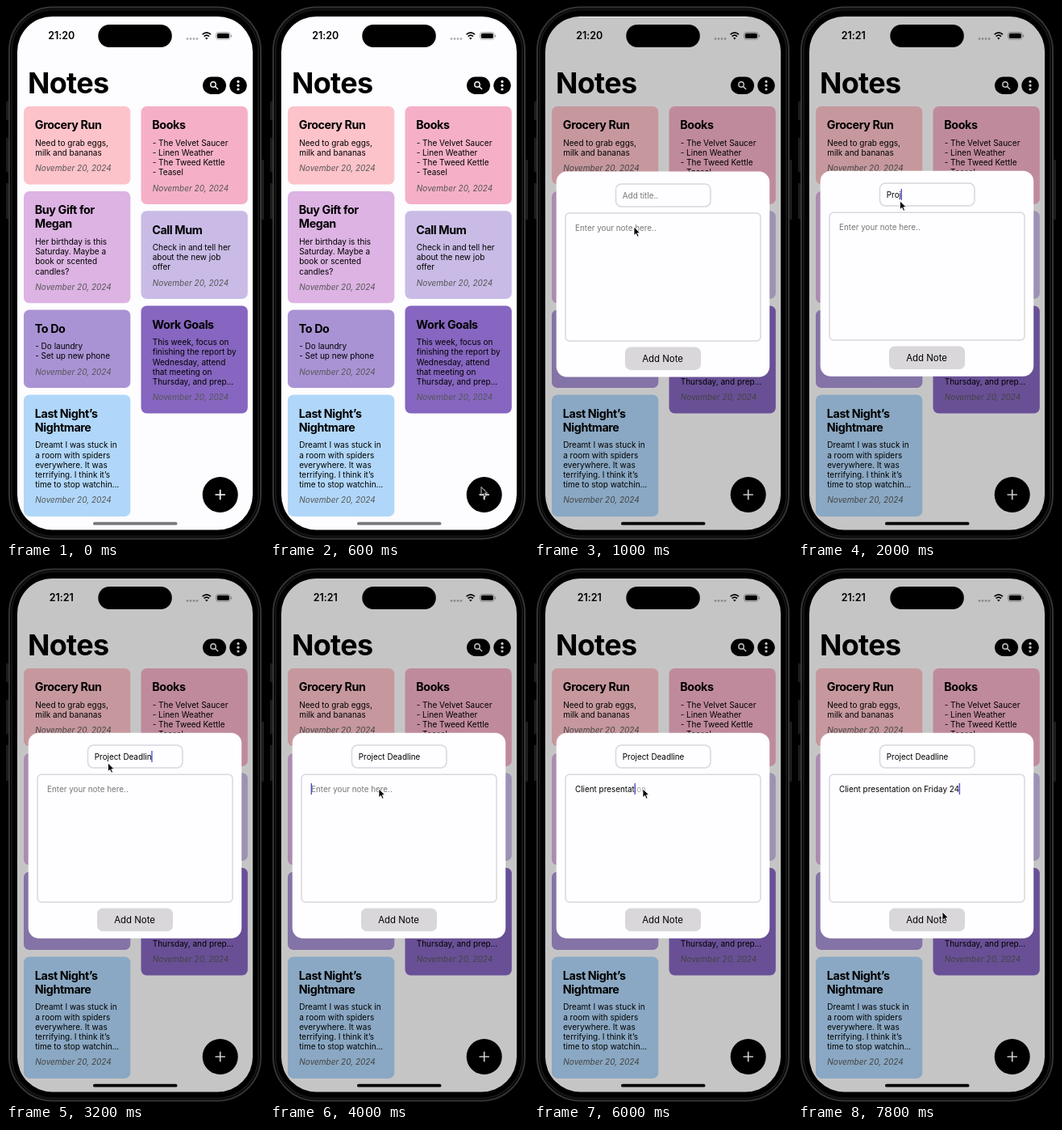
Animation, 320 px wide and 660 px high, one loop 8 s. Source, as an HTML page:

```html
<!DOCTYPE html>
<html lang="en">
<head>
<meta charset="utf-8">
<title>Notes app</title>
<style>
  html, body { margin: 0; width: 100%; height: 100%; overflow: hidden; background: #000; }
  svg { display: block; width: 320px; height: 660px; }
  text { font: 10px Inter, sans-serif; white-space: pre; }
  .heading { font-size: 36px; font-weight: 700; letter-spacing: -.7px; }
  .title { font-size: 14.3px; font-weight: 700; letter-spacing: -.4px; }
  .date { font-style: italic; fill: #555; }
  .clock { font-size: 12.5px; font-weight: 600; letter-spacing: -.05px; }
  .field { font-size: 9.9px; }
  .button { font-size: 11.4px; }
  .middle { text-anchor: middle; }
  .hint { fill: #777; }
  .box { fill: #fefdff; stroke: #d9d7de; stroke-width: 1.5; }
</style>
</head>
<body>
<svg viewBox="0 0 320 660">
  <defs>
    <clipPath id="screen"><rect x="14" y="13" width="292" height="634.5" rx="43.5"/></clipPath>
  </defs>
  <rect width="320" height="660"/>
  <g fill="#1c1c1d">
    <rect y="118" width="4" height="23"/>
    <rect y="163" width="4" height="42"/>
    <rect y="219" width="4" height="44"/>
    <rect x="317" y="190" width="3" height="74"/>
  </g>
  <g fill="none">
    <rect x="4" y="1.5" width="312" height="657" rx="54" stroke="#343436" stroke-width="2"/>
    <rect x="7" y="4.5" width="306" height="651" rx="51" stroke="#161617" stroke-width="2"/>
  </g>

  <g clip-path="url(#screen)">
    <rect x="14" y="13" width="292" height="635" fill="#fdfcfe"/>
    <text class="heading" x="27" y="108">Notes</text>
    <rect x="244" y="87.5" width="29" height="21.5" rx="10.7"/>
    <circle cx="288" cy="98.2" r="10.7"/>
    <g fill="none" stroke="#fff" stroke-width="1.4">
      <circle cx="257" cy="97" r="3.2"/>
      <path d="M259.4 99.4l3.7 3.7"/>
    </g>
    <g fill="#fff">
      <circle cx="288" cy="93.4" r="1.6"/>
      <circle cx="288" cy="98.2" r="1.6"/>
      <circle cx="288" cy="103" r="1.6"/>
    </g>
    <g id="cards"></g>
    <circle cx="265.7" cy="604" r="22"/>
    <path d="M259.5 604h12.4M265.7 597.8v12.4" stroke="#fff" stroke-width="1.7"/>

    <g id="sheet">
      <rect x="14" y="13" width="292" height="635" fill-opacity=".22"/>
      <rect x="27.7" y="203.7" width="264.5" height="254" rx="13" fill="#fefdff"/>
      <rect class="box" x="101.5" y="219" width="117.5" height="28" rx="7"/>
      <rect class="box" x="39" y="255.2" width="242" height="157.8" rx="5"/>
      <rect x="113" y="420.5" width="94" height="28.5" rx="7" fill="#d9d7da"/>
      <text class="button middle" x="159.6" y="439">Add Note</text>
      <g id="titleField"></g>
      <g id="noteField"></g>
    </g>
  </g>

  <rect x="114.3" y="23" width="91.5" height="28" rx="14"/>
  <text class="clock middle" id="clock" x="68.7" y="41.3"></text>
  <g fill="#000" fill-opacity=".35">
    <circle cx="225" cy="40.5" r="1.3"/><circle cx="229" cy="40.5" r="1.3"/>
    <circle cx="233" cy="40.5" r="1.3"/><circle cx="237" cy="40.5" r="1.3"/>
  </g>
  <path d="M243.6 35.2q5.2-4.6 10.4 0M245.6 37.6q3.2-2.8 6.4 0" fill="none" stroke="#000" stroke-width="1.7"/>
  <path d="M248.8 41.6l-1.8-2q1.8-1.4 3.6 0z"/>
  <rect x="260.5" y="32.5" width="17.5" height="8.8" rx="2.8" fill="none" stroke="#000" stroke-opacity=".4" stroke-width=".8"/>
  <rect x="261.8" y="33.8" width="15" height="6.2" rx="1.7"/>
  <rect x="278.9" y="35.4" width="1.1" height="3" rx=".5" fill-opacity=".4"/>
  <rect id="homeBar" x="108" y="637.8" width="104.5" height="3.8" rx="1.9"/>
  <path id="pointer" d="M0 0V10.6L2.5 8.3L4.2 12.2L6 11.4L4.3 7.6H7.6Z" stroke="#fff" stroke-width=".8"/>
</svg>

<script>
const LOOP = 8000, STEP = 200;
const $ = id => document.getElementById(id);
const label = (x, y, content, cls = '') => `<text class="${cls}" x="${x}" y="${y}">${content}</text>`;

const columns = [
  [22, [
    ['#fdc3ca', ['Grocery Run'], ['Need to grab eggs,', 'milk and bananas']],
    ['#dcb3e3', ['Buy Gift for', 'Megan'], ['Her birthday is this', 'Saturday. Maybe a', 'book or scented', 'candles?']],
    ['#a993d4', ['To Do'], ['- Do laundry', '- Set up new phone']],
    ['#b0d7f9', ['Last Night’s', 'Nightmare'], ['Dreamt I was stuck in', 'a room with spiders', 'everywhere. It was', 'terrifying. I think it’s', 'time to stop watchin...']],
  ]],
  [167.5, [
    ['#f5b0c8', ['Books'], ['- The Velvet Saucer', '- Linen Weather', '- The Tweed Kettle', '- Teasel']],
    ['#c9bbe6', ['Call Mum'], ['Check in and tell her', 'about the new job', 'offer']],
    ['#8666c0', ['Work Goals'], ['This week, focus on', 'finishing the report by', 'Wednesday, attend', 'that meeting on', 'Thursday, and prep...']],
  ]],
];

function drawCards() {
  let svg = '';
  for (const [x, cards] of columns) {
    let top = 124;
    for (const [color, title, body] of cards) {
      const titleY = top + 28.2;
      const bodyY = titleY + (title.length - 1) * 17.3 + 20.5;
      const dateY = bodyY + (body.length - 1) * 12.2 + 19.2;
      const bottom = dateY + 16.5;
      svg += `<rect x="${x}" y="${top}" width="132.3" height="${bottom - top}" rx="7" fill="${color}"/>`;
      title.forEach((line, i) => svg += label(x + 13.8, titleY + i * 17.3, line, 'title'));
      body.forEach((line, i) => svg += label(x + 14.2, bodyY + i * 12.2, line));
      svg += label(x + 14.3, dateY, 'November 20, 2024', 'date');
      top = bottom + 8.3;
    }
  }
  $('cards').innerHTML = svg;
}

// Linear interpolation through rows of [time, ...values], held at both ends.
function track(rows, t) {
  if (t <= rows[0][0]) return rows[0].slice(1);
  const next = rows.findIndex(row => row[0] > t);
  if (next < 0) return rows.at(-1).slice(1);
  const a = rows[next - 1], b = rows[next];
  const p = (t - a[0]) / (b[0] - a[0]);
  return a.slice(1).map((v, i) => v + (b[i + 1] - v) * p);
}

const pointerPath = [[800, 262, 594.5], [1000, 124, 273], [1400, 126.5, 241], [3600, 126.5, 241],
  [4000, 135, 273], [7200, 135, 273], [7600, 179, 425]];
const titleTyping = [[1600, 0], [3200, 15], [3400, 16]];
const noteTyping = [[4100, 0], [4800, 6], [6000, 16], [7700, 32]];
const titleText = 'Project Deadline';
const noteText = 'Client presentation on Friday 24';
const predictedWordEnd = 19;

function drawField(group, x, y, typed, { placeholder, prediction = '', focused }) {
  group.innerHTML = typed
    ? label(x, y, `<tspan>${typed}</tspan><tspan fill="#aaa">${prediction}</tspan>`, 'field')
    : label(x, y, placeholder, 'field hint');
  if (!focused) return;
  const width = typed ? group.querySelector('tspan').getComputedTextLength() : 0;
  group.innerHTML += `<rect x="${x + width - .3}" y="${y - 11}" width="1.3" height="14" fill="#4a48cf"/>`;
}

// A critically damped slide up from below the screen.
function sheetOffset(t) {
  const s = Math.max(0, t - 751) * .0355;
  return 635 * (1 + s) * Math.exp(-s);
}

function draw(t) {
  $('clock').textContent = t < 1800 ? '21:20' : '21:21';
  $('sheet').setAttribute('transform', `translate(0 ${sheetOffset(t)})`);
  $('homeBar').setAttribute('fill', t < 800 ? '#777679' : '#000');

  const titleCount = Math.round(track(titleTyping, t)[0]);
  const noteCount = Math.round(track(noteTyping, t)[0]);
  const predicting = noteCount >= 14 && noteCount < predictedWordEnd;
  drawField($('titleField'), 109.8, 237, titleText.slice(0, titleCount),
    { placeholder: 'Add title..', focused: t >= 1400 && t < 4000 });
  drawField($('noteField'), 51, 277, noteText.slice(0, noteCount), {
    placeholder: 'Enter your note here..',
    prediction: predicting ? noteText.slice(noteCount, predictedWordEnd) : '',
    focused: t >= 4000,
  });

  const [x, y] = track(pointerPath, t);
  $('pointer').setAttribute('transform', `translate(${x} ${y})`);
  $('pointer').setAttribute('visibility', t < 400 ? 'hidden' : 'visible');
}

const start = performance.now();
let shown = -1;
function tick() {
  const t = Math.floor((performance.now() - start) % LOOP / STEP) * STEP;
  if (t !== shown) draw(shown = t);
  requestAnimationFrame(tick);
}

drawCards();
draw(0);
tick();
</script>
</body>
</html>
```
